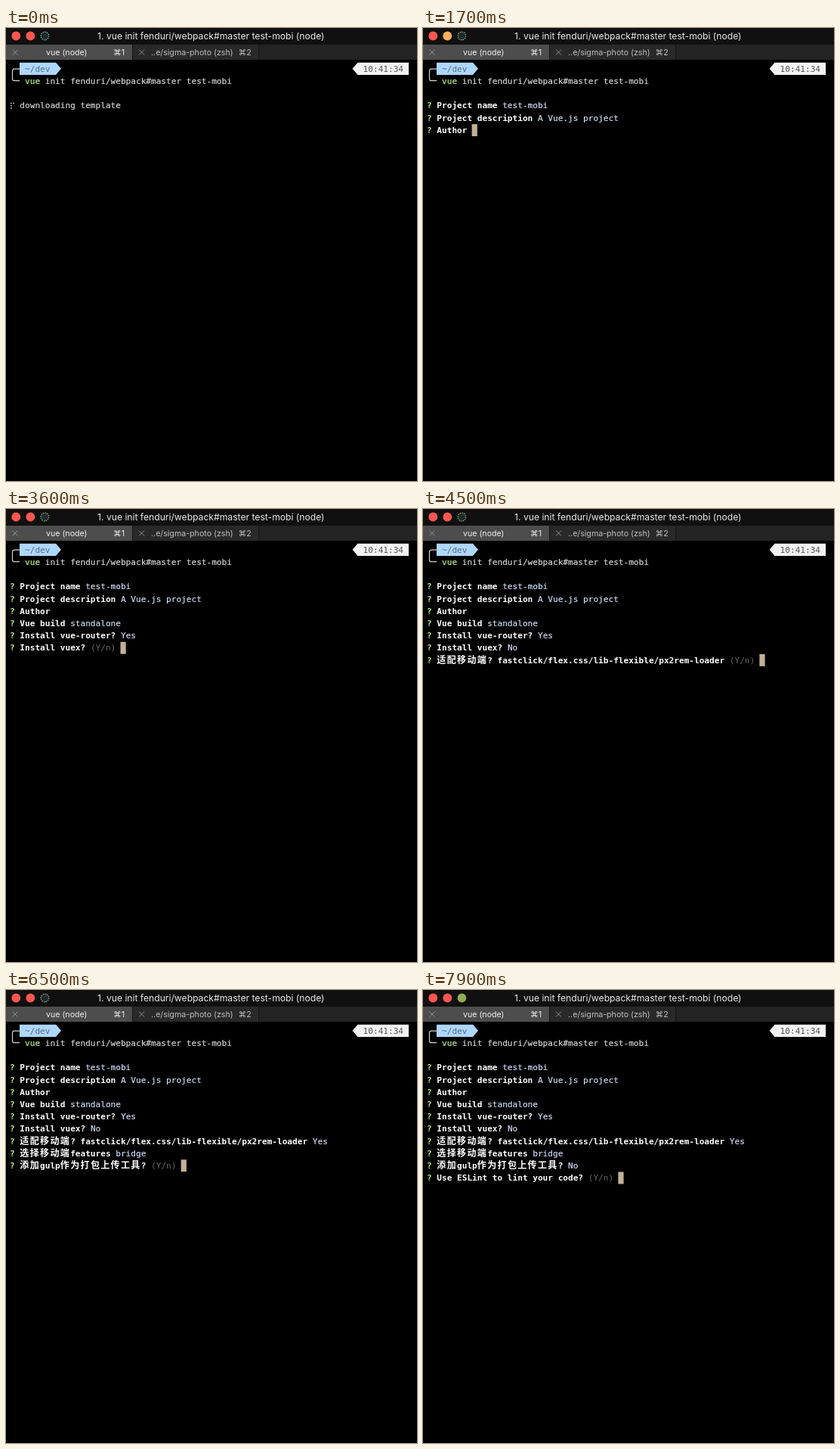
Animation, 544 px wide and 599 px high, one loop 8 s. Source, as an HTML page:

```html
<!DOCTYPE html>
<html lang="en">
<head>
<meta charset="utf-8">
<title>Terminal</title>
<style>
  html, body { margin: 0; width: 100%; height: 100%; overflow: hidden; background: #000; }
  svg { display: block; width: 544px; height: 599px; }
  text { white-space: pre; }
  .ui { font-family: Inter, "DejaVu Sans", sans-serif; font-size: 10.65px; fill: #f0f0f0; }
  .ui.title { font-size: 12.15px; fill: #e8e8e8; }
  .ui.dim { fill: #c0c0c0; }
  .mono { font-family: "DejaVu Sans Mono", "Noto Sans Mono", monospace; font-size: 11.1px; }
  .cjk { font-family: "Noto Sans CJK SC", "Noto Sans CJK", sans-serif; font-size: 12px; letter-spacing: 1.36px; }
  .plain { fill: #d4d4d4; stroke: #d4d4d4; stroke-width: 0.2px; }
  .bold { fill: #fff; font-weight: bold; }
  .mark { fill: #b9ec76; font-weight: bold; }
  .green { fill: #b8f284; stroke: #b8f284; stroke-width: 0.2px; }
  .answer { fill: #d0dcf6; stroke: #d0dcf6; stroke-width: 0.2px; }
  .hint { fill: #686868; }
  .path { fill: #536b80; }
  .clock { fill: #555; }
</style>
</head>
<body>
<svg viewBox="0 0 544 599">
  <rect width="544" height="599"/>
  <rect width="544" height="22" fill="#101010"/>
  <circle cx="13.3" cy="10.5" r="5.9" fill="#fc5750"/>
  <circle id="middle" cx="32.3" cy="10.5" r="5.9"/>
  <circle id="zoom" cx="51.4" cy="10.5" r="5.3" stroke-width="1.2"/>
  <text class="ui title" x="271.3" y="15" text-anchor="middle">1. vue init fenduri/webpack#master test-mobi (node)</text>

  <rect y="22" width="544" height="20" fill="#232323"/>
  <rect y="22" width="167" height="20" fill="#4d4d4d"/>
  <rect x="168" y="22" width="166" height="20" fill="#292929"/>
  <path d="M167.5 22V42M334.5 22V42" stroke="#161616"/>
  <path d="M8.5 28.5l7 7m0-7l-7 7M176 28.5l7 7m0-7l-7 7" stroke="#8c8c8c" fill="none"/>
  <text class="ui" x="53" y="36.3">vue (node)</text>
  <text class="ui" x="142" y="36.3">⌘1</text>
  <text class="ui dim" x="192" y="36.3">..e/sigma-photo (zsh)</text>
  <text class="ui dim" x="307.5" y="36.3">⌘2</text>

  <path d="M18 45.7H66L73 53.8L66 62H18Z" fill="#aed7ff"/>
  <path d="M533 45.7H465.5L458.5 53.8L465.5 62H533Z" fill="#f2f2f2"/>
  <path d="M18 54.2H11Q8.5 54.2 8.5 57V67.2Q8.5 69.7 11 69.7H18" fill="none" stroke="#d4d4d4" stroke-width="1.2"/>
  <g id="prompt"></g>
  <g id="screen"></g>
</svg>
<script>
const LOOP = 8000, COL = 6.68, LEFT = 5, ROW = 16.2, FIRST = 106.4;
const get = id => document.getElementById(id);
const screen = get('screen'), middle = get('middle'), zoom = get('zoom');
const isWide = s => /[\u4e00-\u9fff]/.test(s);
const columns = s => s.length * (isWide(s) ? 2 : 1);
const colX = col => LEFT + col * COL;
const rowY = row => FIRST + row * ROW;

// Lays out [class, text] segments on the character grid.
function line(row, segments, start = 0) {
  let col = start, out = '';
  for (const [style, text] of segments) {
    for (const run of text.match(/[\u4e00-\u9fff]+|[^\u4e00-\u9fff]+/g) || []) {
      const font = isWide(run) ? 'cjk' : 'mono';
      out += `<text class="${font} ${style}" x="${colX(col)}" y="${rowY(row)}">${run}</text>`;
      col += columns(run);
    }
  }
  return { svg: out, col };
}

function cursor(row, col, color) {
  return `<rect x="${colX(col) - 0.5}" y="${rowY(row) - 11.7}" width="7.2" height="16" fill="${color}"/>`;
}

// One question per step; options make it a list without a cursor.
const questions = [
  { at: 700, ask: 'Project name', hint: '(test-mobi) ', answer: 'test-mobi' },
  { at: 1200, ask: 'Project description', hint: '(A Vue.js project) ', answer: 'A Vue.js project' },
  { at: 1500, ask: 'Author', hint: '', answer: '' },
  { at: 1800, ask: 'Vue build', answer: 'standalone', options: [
    'Runtime + Compiler: recommended for most users',
    'Runtime-only: about 6KB lighter min+gzip, but templates (or any Vue-specific HTML) are ONLY allowed in .vue files - render functions are required elsewhere'] },
  { at: 2200, ask: 'Install vue-router?', hint: '(Y/n) ', answer: 'Yes' },
  { at: 3100, ask: 'Install vuex?', hint: '(Y/n) ', answer: 'No' },
  { at: 4100, ask: '适配移动端? fastclick/flex.css/lib-flexible/px2rem-loader', hint: '(Y/n) ', answer: 'Yes' },
  { at: 4800, ask: '选择移动端features', answer: 'bridge', options: ['JsBridge', '微信sdk', 'none (configure it yourself)'] },
  { at: 6400, ask: '添加gulp作为打包上传工具?', hint: '(Y/n) ', answer: 'No' },
  { at: 7500, ask: 'Use ESLint to lint your code?', hint: '(Y/n) ', answer: '' }
];

function spinner(t) {
  const glyphs = '⠋⠙⠹⠸⠼⠴⠦⠧⠇⠏';
  const bits = glyphs.charCodeAt((9 + Math.floor(t / 80)) % 10) - 0x2800;
  let out = '';
  for (let i = 0; i < 6; i++) {
    if (bits >> i & 1) {
      out += `<rect x="${i < 3 ? 6 : 9.3}" y="${98.6 + i % 3 * 3.3}" width="1.6" height="1.6" fill="#d4d4d4"/>`;
    }
  }
  return out + line(0, [['plain', 'downloading template']], 2).svg;
}

function optionList(row, options) {
  let out = '';
  options.forEach((option, i) => {
    const text = (i ? '  ' : '❯ ') + option;
    for (let k = 0; k < text.length; k += 80) {
      out += line(row++, [[i ? 'plain' : 'answer', text.slice(k, k + 80)]]).svg;
    }
  });
  return out;
}

const isOrange = t => t >= 1000 && t < 2800;

function render(t) {
  if (t < questions[0].at) return spinner(t);
  let out = '';
  questions.forEach((q, row) => {
    if (t < q.at) return;
    const next = questions[row + 1];
    const head = [['mark', '? '], ['bold', q.ask + ' ']];
    if (next && t >= next.at) {
      out += line(row, [...head, ['answer', q.answer]]).svg;
    } else if (q.options) {
      out += line(row, [...head, ['hint', '(Use arrow keys)']]).svg + optionList(row + 1, q.options);
    } else {
      const typed = q.answer === 'No' && t >= next.at - 200 ? 'n' : '';
      const laid = line(row, [...head, ['hint', q.hint], ['plain', typed]]);
      const color = isOrange(t) && t >= 2200 ? '#fcae67' : '#c0b199';
      out += laid.svg + cursor(row, laid.col, color);
    }
  });
  return out;
}

get('prompt').innerHTML =
  line(-3, [['path', '~/dev']], 3).svg +
  line(-3, [['clock', '10:41:34']], 70).svg +
  line(-2, [['green', 'vue'], ['plain', ' init fenduri/webpack#master test-mobi']], 3).svg;

function paint(t) {
  const solid = t >= 7300;
  middle.setAttribute('fill', isOrange(t) ? '#fdb05f' : '#fc5750');
  zoom.setAttribute('fill', solid ? '#90ad52' : '#1f2a2b');
  zoom.setAttribute('stroke', solid ? '#90ad52' : t < 1000 ? '#6fae9c' : '#86a878');
  zoom.setAttribute('stroke-dasharray', solid ? 'none' : '1.6 1.1');
  screen.innerHTML = render(t);
}

const begin = performance.now();
function tick() {
  paint((performance.now() - begin) % LOOP);
  requestAnimationFrame(tick);
}
tick();
</script>
</body>
</html>
```
